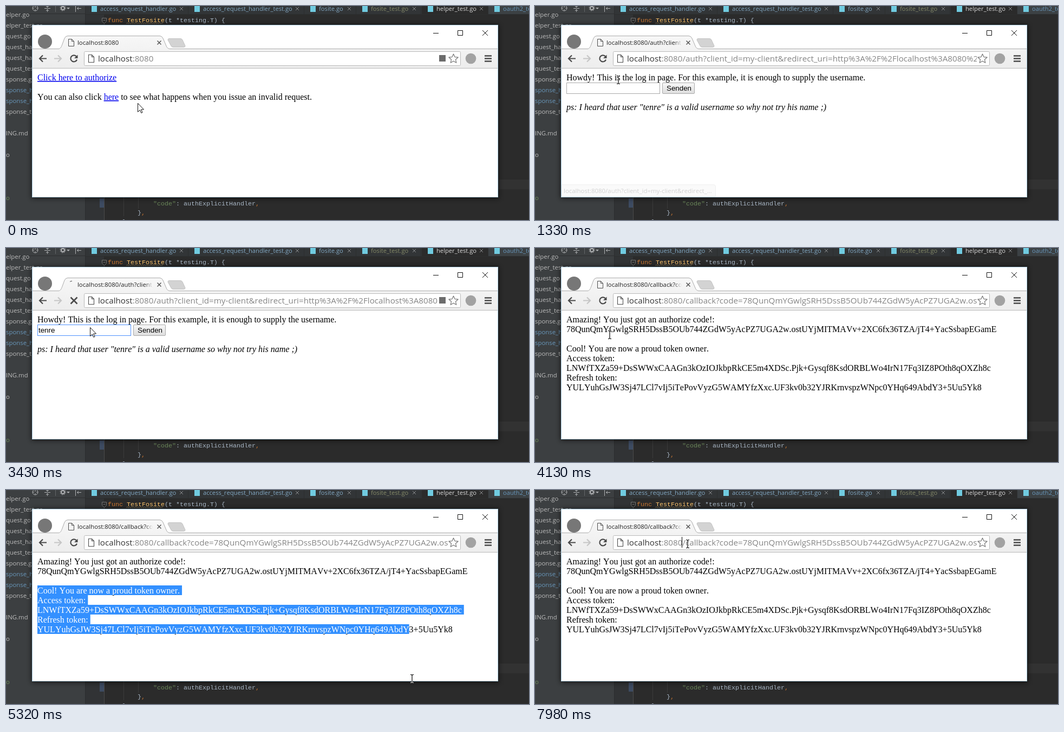
An HTML page for the animation above (8000 ms loop, 966 by 397 pixels).

```html
<!DOCTYPE html>
<html lang="en">
<head>
<meta charset="utf-8">
<title>OAuth2 demo</title>
<style>
html, body { margin: 0; width: 100%; height: 100%; overflow: hidden; background: #2b2b2b; }
svg { display: block; }
text { white-space: pre; font-kerning: none; font-variant-ligatures: none; }
.ui { font-family: "Open Sans", "Noto Sans", sans-serif; }
.code { font: 11.667px "Liberation Mono", monospace; fill: #a9b7c6; }
.page text { font: 16px "Liberation Serif", serif; font-kerning: none; }
.page .control { font: 13.333px "Liberation Sans", sans-serif; font-kerning: none; }
.page .hint { font-style: italic; }
.link { fill: #0000ee; text-decoration: underline; }
.line { fill: none; stroke: #4c4c4c; }
#cursor { mix-blend-mode: normal; }
#cursor.inverted { mix-blend-mode: difference; }
</style>
</head>
<body>
<svg id="stage" width="966" height="397" viewBox="0 0 966 397">
  <defs>
    <linearGradient id="buttonFill" x2="0" y2="1"><stop stop-color="#f8f8f8"/><stop offset="1" stop-color="#dddddd"/></linearGradient>
    <linearGradient id="barFill" x2="0" y2="1"><stop stop-color="#f7f7f7"/><stop offset="1" stop-color="#ededed"/></linearGradient>
    <linearGradient id="titleFade"><stop stop-color="#f5f5f5" stop-opacity="0"/><stop offset="1" stop-color="#f5f5f5"/></linearGradient>
    <filter id="shadow" x="-5%" y="-10%" width="110%" height="120%"><feGaussianBlur stdDeviation="5"/></filter>
    <clipPath id="urlClip"><rect id="urlBox" x="165" y="84" height="28"/></clipPath>
    <clipPath id="titleClip"><rect x="130" y="56" width="141" height="22"/></clipPath>
    <clipPath id="selection"></clipPath>
  </defs>

  <!-- editor -->
  <rect width="966" height="397" fill="#2b2b2b"/>
  <rect x="147" y="322" width="819" height="18" fill="#323232"/>
  <rect x="147" y="15" width="34" height="382" fill="#313335"/>
  <path d="M181.5 32V397" stroke="#4b4b4b"/>
  <path d="M217.5 355V390M244.5 355V376" stroke="#3b3b3b"/>
  <rect x="173" y="357" width="8" height="17" fill="#3d4b62"/>
  <path d="M177.5 22.5h8v6l-4 4-4-4zM179.5 26.5h4" fill="#2b2b2b" stroke="#757575"/>
  <text class="code" x="188" y="30"><tspan fill="#cc7832">func </tspan><tspan fill="#ffc66d">TestFosite</tspan>(t *testing.T) {</text>
  <path id="squiggle" fill="none" stroke="#8a8060" stroke-width=".8"/>
  <text class="code" x="272" y="370"><tspan fill="#6a8759">"code"</tspan>: authExplicitHandler<tspan fill="#cc7832">,</tspan></text>
  <text class="code" x="243" y="387">}<tspan fill="#cc7832">,</tspan></text>
  <text class="code" x="215" y="404">}<tspan fill="#cc7832">,</tspan></text>
  <rect width="147" height="397" fill="#3c3f41"/>
  <rect x="147" width="819" height="15" fill="#323537"/>
  <path d="M0 14.5H147M146.5 0V397M147 15.5H966" stroke="#2c2e2f"/>
  <g fill="none" stroke="#afb1b3">
    <circle cx="54" cy="4" r="5"/><path d="M54 0v3M54 6v3M49 4h3M56 4h3"/>
    <path d="M71 4.5h11M76.5 -1v3M74 0l2.5 2.5 2.5 -2.5M76.5 11v-4M74 9l2.5 -2.5 2.5 2.5"/>
    <path d="M91.5 0v11" stroke="#626567"/>
    <circle cx="105" cy="4" r="3" stroke-width="2"/><circle cx="105" cy="4" r="5" stroke-dasharray="2 1.93"/>
    <path d="M112 3h6l-3 3z" fill="#afb1b3" stroke="none"/>
    <path d="M128.5 0v11M139 4.5h-8M134 2l-2.5 2.5 2.5 2.5"/>
  </g>
  <g id="files" class="ui" font-size="11.4"></g>
  <g id="tabs" class="ui" font-size="11.2"></g>

  <!-- browser window -->
  <rect x="47" y="35" width="863" height="322" opacity=".6" filter="url(#shadow)"/>
  <rect x="48.5" y="35.5" width="860" height="319" fill="#fff" stroke="#b9d9ec"/>
  <circle cx="72" cy="66" r="13" fill="#777777"/>
  <path d="M49 79.5H97C101 79 102 76 104 71L108 60Q110 55.5 114 55.5H284Q288 55.5 290 60L296 74Q298 79.5 303 79.5H908V115H49Z" fill="url(#barFill)"/>
  <path d="M49 79.5H97C101 79 102 76 104 71L108 60Q110 55.5 114 55.5H284Q288 55.5 290 60L296 74Q298 79.5 303 79.5H908" fill="none" stroke="#ababab"/>
  <path d="M49 115.5H908" stroke="#b8b8b8"/>
  <path d="M301 60.5H322Q325 60.5 326 63L331 74Q331 76.5 328 76.5H309Q306 76.5 305 74L299 63Q299 60.5 301 60.5Z" fill="#d3d3d3" stroke="#c2c2c2"/>
  <path d="M789 50.5h10M834.5 45.5h9v9h-9zM880 45l10 10M890 45l-10 10" fill="none" stroke="#111"/>
  <path d="M279.5 64.5l7 7M286.5 64.5l-7 7" stroke="#555" stroke-width="1.5"/>
  <path id="tabIcon" class="line" d="M115.5 61.5h6l4 4v9h-10zM121.5 61.5v4h4"/>
  <path id="spinner" class="line" d="M118 62.5q2 -1.5 4 -1"/>
  <text id="title" class="ui" x="132" y="72" font-size="11.3" fill="#222" clip-path="url(#titleClip)"></text>
  <rect x="257" y="60" width="14" height="16" fill="url(#titleFade)"/>
  <g fill="none" stroke-width="2.2">
    <path d="M75 97.5H62M68 91.5l-6 6 6 6" stroke="#4a4a4a"/>
    <path d="M89 97.5H102M96 91.5l6 6 -6 6" stroke="#c6c6c6"/>
    <g id="reload" stroke="#4a4a4a"><path d="M130 93.5A6 6 0 1 0 131 99.5"/><path d="M132.5 90.5v6.5h-6.5z" fill="#4a4a4a" stroke="none"/></g>
    <path id="stop" d="M119.5 91.5l12 12M131.5 91.5l-12 12" stroke="#4a4a4a" stroke-width="2.6"/>
  </g>
  <rect x="144.5" y="84.5" width="695" height="26" rx="2" fill="#fff" stroke="#b9b9b9"/>
  <path class="line" d="M152.5 90.5h6l4 4v10h-10zM158.5 90.5v4h4" stroke-width="1.1"/>
  <text class="ui" x="170" y="103" font-size="15.2" fill="#333" clip-path="url(#urlClip)">localhost<tspan id="urlRest" fill="#858585"></tspan></text>
  <rect id="urlCaret" x="271" y="87" width="1" height="20"/>
  <rect id="translate" x="800" y="91" width="12" height="12" fill="#6c6c6c"/>
  <path id="star" fill="#fff" stroke="#777" stroke-width="1.2" stroke-linejoin="round"/>
  <circle cx="858.5" cy="97.5" r="9.8" fill="#a2a2a2"/>
  <path d="M884 92.5h13M884 97.5h13M884 102.5h13" stroke="#4a4a4a" stroke-width="2.6"/>

  <!-- pages -->
  <g class="page">
    <text x="58" y="138" class="link">Click here to authorize</text>
    <text x="58" y="174">You can also click <tspan class="link">here</tspan> to see what happens when you issue an invalid request.</text>
  </g>
  <g class="page">
    <text x="58" y="138">Howdy! This is the log in page. For this example, it is enough to supply the username.</text>
    <rect id="field" x="58.5" y="142.5" width="172" height="20" fill="#fff"/>
    <text id="typed" class="control" x="60" y="157"></text>
    <rect id="caret" y="145" width="1" height="15"/>
    <rect x="235.5" y="142.5" width="59" height="20" rx="1.5" fill="url(#buttonFill)" stroke="#a9a9a9"/>
    <text class="control" x="243" y="157">Senden</text>
    <text class="hint" x="58" y="193">ps: I heard that user "tenre" is a valid username so why not try his name ;)</text>
  </g>
  <g class="page">
    <text x="58" y="138">Amazing! You just got an authorize code!:</text>
    <text x="58" y="156">78QunQmYGwlgSRH5DssB5OUb744ZGdW5yAcPZ7UGA2w.ostUYjMITMAVv+2XC6fx36TZA/jT4+YacSsbapEGamE</text>
    <g id="tokens"></g>
    <g clip-path="url(#selection)"><rect x="50" y="170" width="850" height="110" fill="#3390ff"/><g id="tokensLit" fill="#fff"></g></g>
  </g>

  <g id="bubble">
    <path d="M49.5 331.5H330Q333.5 331.5 333.5 335V353.5H49.5Z" fill="#f2f2f2" stroke="#d0d0d0"/>
    <text class="ui" x="53" y="347" font-size="11.45" fill="#777">localhost:8080/auth?client_id=my-client&amp;redirect_...</text>
  </g>

  <g id="cursor">
    <path id="arrow" d="M.5 .5V16.5L4.3 13 6.8 18.5 9 17.5 6.6 12H11.5Z" fill="#fff" stroke="#111"/>
    <path id="beam" d="M-3 -7.5H-1.5L0 -6.5 1.5 -7.5H3M0 -6.5V6.5M-3 7.5H-1.5L0 6.5 1.5 7.5H3" fill="none" stroke="#fff" stroke-width="1.2"/>
    <path id="hand" d="M-1.5 1.5Q0 -1 1.5 1.5V7Q3 5.5 4.5 7.5 6 6 7.5 8 9.5 7 10.5 9V14L8.5 19H0L-6 11.5Q-5 8.5 -1.5 12Z" fill="#fff" stroke="#111"/>
  </g>
</svg>
<script>
const LOOP = 8000, STEP = 70, LEFT = 58;
const $ = id => document.getElementById(id);
const show = (el, on) => el.setAttribute('visibility', on ? 'visible' : 'hidden');
const make = (parent, tag, attrs, text = '') => {
  const el = document.createElementNS('http://www.w3.org/2000/svg', tag);
  for (const key in attrs) el.setAttribute(key, attrs[key]);
  el.textContent = text;
  return parent.appendChild(el);
};

const GREY = '#bbbbbb', BLUE = '#6897bb', GREEN = '#6c8a5b';
const files = ['elper.go', 'elper_test.go', 'quest.go', 'quest_handler.go', 'quest_handler_test.go', 'quest_test.go',
  'sponse.go', 'sponse_handler.go', 'sponse_handler_test.go', 'sponse_test.go', '', 'ING.md', '', 'o', '', '', '', 'o'];
files.forEach((name, i) => make($('files'), 'text',
  { x: 0, y: 20 + i * 20, fill: i == 17 ? GREEN : i == 7 || i == 8 ? BLUE : GREY }, name));

// label, x, close button x, text colour, background
const tabs = [
  ['access_request_handler.go', 174, 324, '#83a9c4'], ['access_request_handler_test.go', 364, 538, '#83a9c4'],
  ['fosite.go', 578, 634, '#83a9c4'], ['fosite_test.go', 674, 754, '#858a68'],
  ['helper_test.go', 795, 878, '#d8d8d8', '#2b2b2b'], ['oauth2_test.go', 918, 1010, BLUE, '#3c4144']];
tabs.forEach(([name, x, close, fill, back = 'none']) => {
  make($('tabs'), 'rect', { x: x - 27, y: 0, width: close + 40 - x, height: 15, fill: back });
  make($('tabs'), 'rect', { x: x - 16, y: 0, width: 10, height: 11, fill: '#70cbe0' });
  make($('tabs'), 'text', { x, y: 9, fill }, name);
  make($('tabs'), 'path', { d: `M${close - 3} 2l6 6m0 -6l-6 6`, stroke: '#8a8c8e' });
  make($('tabs'), 'path', { d: `M${close + 12.5} 0v15`, stroke: '#2c2e2f' });
});

$('squiggle').setAttribute('d', 'M222 33' + 'l2 -2l2 2'.repeat(17));
$('star').setAttribute('d', 'M' + Array.from({ length: 10 }, (_, i) => {
  const r = i % 2 ? 4.2 : 9, a = i * Math.PI / 5;
  return [826.5 + r * Math.sin(a), 98 - r * Math.cos(a)].map(v => v.toFixed(1));
}).join('L') + 'Z');

const tokenLines = ['Cool! You are now a proud token owner.', 'Access token:',
  'LNWfTXZa59+DsSWWxCAAGn3kOzIOJkbpRkCE5m4XDSc.Pjk+Gysqf8KsdORBLWo4IrN17Fq3IZ8POth8qOXZh8c', 'Refresh token:',
  'YULYuhGsJW3Sj47LCl7vIj5iTePovVyzG5WAMYfzXxc.UF3kv0b32YJRKrnvspzWNpc0YHq649AbdY3+5Uu5Yk8'];
const rows = tokenLines.map((line, i) => {
  const at = { x: LEFT, y: 192 + 18 * i };
  make($('tokensLit'), 'text', at, line);
  return {
    text: make($('tokens'), 'text', at, line),
    rect: make($('selection'), 'rect', { x: LEFT, y: 177 + 18 * i, width: 0, height: 18 })
  };
});

const pages = document.querySelectorAll('.page');
const paths = ['', '/auth?client_id=my-client&redirect_uri=http%3A%2F%2Flocalhost%3A8080%2Fcallback',
  '/callback?code=78QunQmYGwlgSRH5DssB5OUb744ZGdW5yAcPZ7UGA2w.ostUYjMITMAVv'];

// time, x, y, pointer shape from this time on
const track = [
  [0, 243, 180, 'arrow'], [140, 243, 180, 'arrow'], [420, 170, 140, 'hand'], [560, 154, 134, 'hand'],
  [910, 154, 134, 'arrow'], [1120, 154, 134, 'arrow'], [1190, 154, 135, 'beam'], [1330, 154, 137, 'beam'],
  [1610, 155, 147, 'beam'], [3430, 155, 147, 'arrow'], [3990, 155, 147, 'arrow'], [4060, 155, 147, 'beam'],
  [4340, 87, 204, 'beam'], [4410, 87, 204, 'beam'], [4550, 64, 179, 'beam'], [4690, 64, 179, 'beam'],
  [4900, 138, 225, 'beam'], [5320, 750, 350, 'beam'], [5460, 893, 359, 'beam'], [5670, 893, 359, 'beam'],
  [5740, 820, 340, 'arrow'], [5880, 730, 306, 'arrow'], [6160, 730, 306, 'arrow'], [6230, 730, 305, 'arrow'],
  [6510, 730, 305, 'arrow'], [6650, 650, 268, 'beam'], [7210, 328, 122, 'arrow'], [7280, 288, 104, 'beam'],
  [7350, 276, 102, 'beam'], [7420, 279, 100, 'beam'], [7490, 282, 100, 'beam'], [LOOP, 282, 100, 'beam']];

function pointerAt(t) {
  const i = track.findIndex(key => key[0] > t);
  const [t0, x0, y0, shape] = track[i - 1], [t1, x1, y1] = track[i];
  const k = (t - t0) / (t1 - t0);
  return { x: Math.round(x0 + (x1 - x0) * k), y: Math.round(y0 + (y1 - y0) * k), shape };
}

const widthOf = (text, n) => n ? text.getSubStringLength(0, n) : 0;

function snapToChar(text, x) {
  let best = 0;
  for (let n = 1; n <= text.textContent.length; n++) {
    const w = widthOf(text, n);
    if (Math.abs(w - x) < Math.abs(best - x)) best = w;
  }
  return best;
}

function drawSelection(t) {
  const active = t >= 4760 && t < 6510;
  const end = pointerAt(Math.min(t, 5460));
  const last = Math.max(0, Math.min(4, Math.floor((end.y - 178) / 18)));
  rows.forEach(({ text, rect }, i) => {
    const full = text.getComputedTextLength() + 4;
    const width = !active || i > last ? 0 : i < last ? full : snapToChar(text, end.x - 3 - LEFT);
    rect.setAttribute('width', width);
  });
}

function render(time) {
  const t = Math.floor(time / STEP) * STEP;
  const page = t < 910 ? 0 : t < 3500 ? 1 : 2;
  const loading = t >= 700 && t < 980 || t >= 3430 && t < 3500;
  const translate = t < 700 || t >= 1400 && t < 3500;
  pages.forEach((el, i) => el.style.display = i == page ? '' : 'none');

  $('title').textContent = 'localhost:8080' + paths[page];
  $('urlRest').textContent = ':8080' + paths[page];
  $('urlBox').setAttribute('width', (translate ? 797 : 816) - 165);
  show($('translate'), translate);
  show($('spinner'), loading);
  show($('tabIcon'), !loading);
  show($('stop'), loading);
  show($('reload'), !loading);
  show($('urlCaret'), t >= 7910);

  const fadeIn = (t - 420) / 140, fadeOut = (1400 - t) / 210;
  $('bubble').setAttribute('opacity', Math.max(0, Math.min(1, fadeIn, fadeOut)));

  if (page == 1) {
    const count = t < 2310 ? 0 : t < 2660 ? Math.min(4, (t - 2310) / STEP + 1) : 5;
    $('typed').textContent = 'tenre'.slice(0, count);
    $('field').setAttribute('stroke', t >= 1610 ? '#4d90fe' : '#a9a9a9');
    $('caret').setAttribute('x', Math.floor(60 + widthOf($('typed'), count)));
    show($('caret'), t >= 1610 && t < 2100 || t >= 2310 && t < 3080);
  }
  if (page == 2) drawSelection(t);

  const pointer = pointerAt(t);
  $('cursor').setAttribute('transform', `translate(${pointer.x} ${pointer.y})`);
  $('cursor').setAttribute('class', pointer.shape == 'beam' ? 'inverted' : '');
  for (const shape of ['arrow', 'beam', 'hand']) show($(shape), shape == pointer.shape);
}

const start = performance.now();
function frame() {
  render((performance.now() - start) % LOOP);
  requestAnimationFrame(frame);
}
frame();
</script>
</body>
</html>
```
